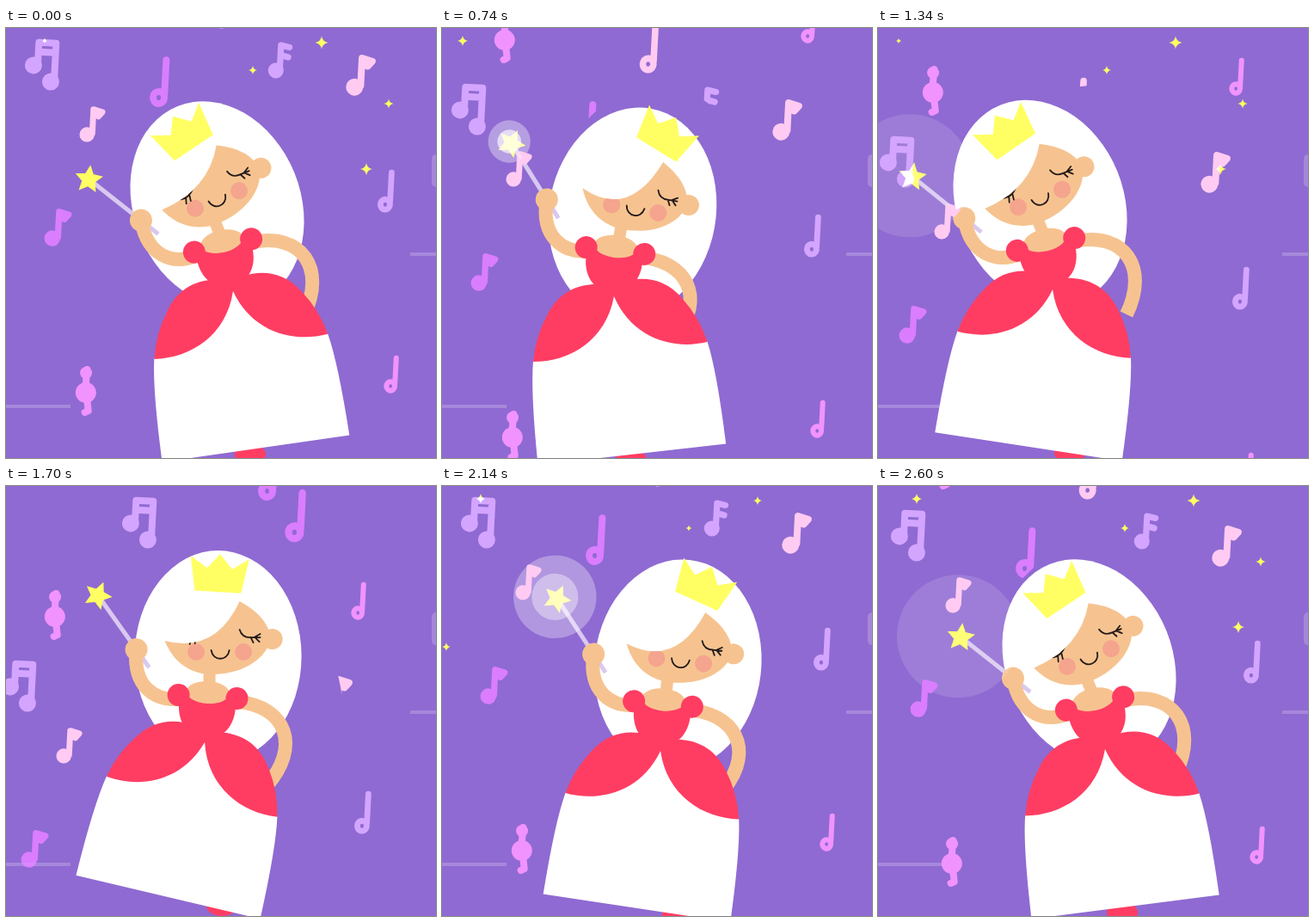
An HTML page with a canvas for the animation above (2.66 s loop, 500x500 px).

```html
<!DOCTYPE html>
<html lang="en">
<head>
<meta charset="utf-8">
<title>Dancing princess</title>
<style>
  html, body { margin: 0; height: 100%; overflow: hidden; background: #8f6ad2; }
  canvas { display: block; }
</style>
</head>
<body>
<canvas id="stage" width="500" height="500"></canvas>
<script>
const ctx = document.getElementById('stage').getContext('2d');
const LOOP = 2660, BEAT = LOOP / 2;
const SKIN = '#f6c390', RED = '#ff3d63', YELLOW = '#ffff63', INK = '#221a1a';
const LILAC = '#d3a5ff', VIOLET = '#da7dff', PINK = '#f193ff', PALE = '#ffcbf2';

// time, neck x, neck y, torso / head / crown / skirt tilt, waist x, waist y
const POSES = [
  [0, 252, 253, -13, -22, -34, -8.2, 264, 306],
  [340, 226, 238.5, -2.5, -6.5, -6, -14.2, 233, 292],
  [740, 201.5, 259, 6.6, 10, 31.5, -6.5, 200, 312],
  [1020, 191, 240, -3, -6, -1, 0, 197, 293],
  [1340, 195, 251.5, -12.5, -22, -34.6, 8.7, 203, 304],
  [1700, 234.5, 245, 3.3, 0, 3.4, 13.3, 231, 298],
  [2020, 254, 258, 6.6, 10, 32, 11, 248, 311],
  [2140, 257, 253.5, 5.5, 6.5, 24.6, 8.6, 254, 308],
  [2350, 259, 240, -3, -6, -1, 1, 263, 293],
  [2600, 252, 253, -13, -22, -33.5, -7.3, 264, 306]
];

// x, y, radius, start, duration
const SPARKLES = [
  [45, 15, 6, 660, 720], [287, 49, 5, 745, 915], [367, 17, 7.5, 745, 915],
  [445, 88, 5.5, 900, 800], [419, 164, 7, 900, 800], [5, 187, 5, 745, 455]
];

// shape, x, y, scale, colour
const NOTES = [
  ['pair', 43, 42, 1, LILAC], ['pair', 183, -148, 1, LILAC],
  ['half', 180, 63, 1, VIOLET], ['half', 365, -155, 1.05, VIOLET],
  ['half', 333, -202, 1, VIOLET], ['half', 253, -27, .95, PALE],
  ['half', 443, 190, .85, LILAC], ['half', 449, 403, .75, PINK],
  ['half', 438, -56, .75, PINK], ['flags', 318, 38, .9, LILAC],
  ['flag', 412, 55, 1, PALE], ['flag', 100, 112, .87, PALE],
  ['flag', 60, 232, .92, VIOLET],
  ['clef', 93, 421, 1, PINK], ['clef', 84, -41, 1, PINK]
];
const NOTE_STEP = 300;
const NOTE_SHIFT = [[0, 0], [-7, 15], [-11, 52], [-16, 82], [-20, 113], [-27, 190], [-34, 225]];
const STROKES = {
  pair: 'M-10 3h.1M10 20h.1M-6 2V-25H14V18M-6 -14H14',
  half: 'M5 -26V14M5 18a6.5 7 0 1 1 -13 0a6.5 7 0 1 1 13 0',
  flag: 'M1 12V-20L13 -17L8 -11L2 -14',
  flags: 'M1 12V-20L12 -18M2 -7L11 -5',
  clef: 'M0 -24L-1 6M1 6L4 24L0 26'
};
const HEADS = { pair: [[-11, 2, 10], [10, 20, 10]], half: [], flag: [[-6, 14, 10]],
  flags: [[-4, 13, 10]], clef: [[-1, -20, 7], [0, 3, 12]] };

const SKIRT = 'M-102 65Q-109 100 -110 185H110Q109 100 102 65L80 14L0 -10L-80 14Z';
const PETAL = 'M-8 -9C18 -20 55 -24 79 12Q96 36 102 65C60 70 15 50 0 0Z';
const CROWN = 'M-34 0L-27 40H27L34 0L15 13L0 -4L-14 13Z';

const mod = (a, b) => ((a % b) + b) % b;
const rad = deg => deg * Math.PI / 180;

// Smooth cyclic interpolation without overshoot
function poseAt(t) {
  const n = POSES.length;
  const key = i => ({ v: POSES[mod(i, n)], t: POSES[mod(i, n)][0] + Math.floor(i / n) * LOOP });
  let i = n - 1;
  while (POSES[i][0] > t) i--;
  const [a, b, c, d] = [key(i - 1), key(i), key(i + 1), key(i + 2)];
  const h = c.t - b.t, u = (t - b.t) / h;
  const slope = (p, q, k) => (q.v[k] - p.v[k]) / (q.t - p.t);
  const tangent = (p, q) => p * q > 0 ? 2 * p * q / (p + q) : 0;
  return b.v.map((v, k) => {
    const s = slope(b, c, k);
    const m0 = tangent(slope(a, b, k), s) * h, m1 = tangent(s, slope(c, d, k)) * h;
    const delta = c.v[k] - v;
    return v + u * (m0 + u * (3 * delta - 2 * m0 - m1 + u * (m0 + m1 - 2 * delta)));
  }).slice(1);
}

function group(x, y, tilt, draw) {
  ctx.save();
  ctx.translate(x, y);
  ctx.rotate(rad(tilt));
  draw();
  ctx.restore();
}
function fill(d, color) {
  ctx.fillStyle = color;
  ctx.fill(new Path2D(d));
}
function stroke(d, color, width, cap = 'butt') {
  ctx.strokeStyle = color;
  ctx.lineWidth = width;
  ctx.lineCap = cap;
  ctx.lineJoin = 'round';
  ctx.stroke(new Path2D(d));
}
function oval(x, y, rx, ry, color) {
  ctx.fillStyle = color;
  ctx.beginPath();
  ctx.ellipse(x, y, rx, ry, 0, 0, 7);
  ctx.fill();
}
const dot = (x, y, r, color) => oval(x, y, r, r, color);

function star(x, y, r) {
  ctx.fillStyle = YELLOW;
  ctx.beginPath();
  for (let i = 0; i < 10; i++) {
    const a = rad(20 + i * 36), q = i % 2 ? r * .48 : r;
    ctx.lineTo(x + q * Math.sin(a), y - q * Math.cos(a));
  }
  ctx.fill();
}

function drawHead(tilt) {
  const bang = Math.max(-66, 1.2 * tilt - 50);
  const face = `M-50 -65Q9 ${bang} 37 -111Q72 -92 73 -66C66 -40 35 -26 6 -26C-25 -26 -42 -45 -50 -65Z`;
  stroke('M2 2V-32', SKIN, 14);
  dot(75, -67, 12, SKIN);
  fill(face, SKIN);
  ctx.clip(new Path2D(face + 'M60 -85h30v30h-30Z'));
  dot(-13.5, -52, 10, '#f5a48e');
  dot(41.5, -52, 10, '#f5a48e');
  stroke('M4 -54C6 -41 23 -41 25 -54', INK, 1.8, 'round');
  stroke('M37 -78q3 10 14 9h10M50 -69l3 6M55 -69l5 5M54 -69l7 -4', INK, 1.8, 'round');
  stroke('M-25 -68q10 2 17 -6M-19 -67l-2 6M-14 -68l-1 6', INK, 1.8, 'round');
}

function drawPrincess([x, y, torso, head, crown, skirt, wx, wy]) {
  group(x, y, head, () => oval(12, -47, 97, 123, '#fff'));
  group(x, y, torso, () => stroke('M36 4C92 6 112 52 74 100', SKIN, 16));
  group(x, y, head, () => drawHead(head));

  oval(wx + 20, wy + 190, 18, 12, RED);
  group(wx, wy, skirt, () => {
    fill(SKIRT, '#fff');
    fill(PETAL, RED);
    ctx.scale(-1, 1);
    fill(PETAL, RED);
  });

  group(x, y, torso, () => {
    stroke('M-70 -30L-134 -110', '#d9c8f0', 5);
    stroke('M-30 4C-60 10 -88 -6 -86 -50', SKIN, 16);
    dot(-86, -50, 13, SKIN);
    star(-134.5, -110, 17);
    fill('M-33 10C-33 62 33 62 33 10L28 -8H-28Z', RED);
    oval(0, -5, 25, 13, SKIN);
    dot(-34, 0, 13, RED);
    dot(34, 0, 13, RED);
  });

  const a = rad(.69 * crown + 2.6), r = 162 + .14 * crown;
  group(x + r * Math.sin(a), y - r * Math.cos(a), crown, () => fill(CROWN, YELLOW));
}

function drawGlow(t, [x, y, torso]) {
  const age = t - (t < 1930 ? 660 : 1930);
  if (age < 0 || age > 730) return;
  const r = 74 * (1 - Math.exp(-age / 200));
  group(x, y, torso, () => {
    dot(-137, -112, r, `rgba(255,255,255,${.38 * (1 - age / 1000)})`);
    if (age < 400) dot(-137, -112, r * .56, `rgba(255,255,255,${.8 * (1 - age / 400)})`);
  });
}

function drawSparkles(t) {
  for (const [x, y, size, start, length] of SPARKLES) {
    const since = mod(t - start, LOOP), age = since % BEAT;
    if (age > length) continue;
    const r = size * Math.min(1, 3 * Math.sin(Math.PI * age / length));
    group(x - (since < BEAT ? 21 : 0), y, 0, () =>
      fill(`M0 ${-r}Q${r * .15} ${-r * .15} ${r} 0Q${r * .15} ${r * .15} 0 ${r}` +
        `Q${-r * .15} ${r * .15} ${-r} 0Q${-r * .15} ${-r * .15} 0 ${-r}Z`, YELLOW));
  }
}

function drawNotes(t) {
  const [dx, dy] = NOTE_SHIFT[Math.floor(t / NOTE_STEP) % NOTE_SHIFT.length];
  ctx.save();
  ctx.beginPath();
  ctx.rect(0, 0, 500, 500);
  ctx.ellipse(250, 300, 145, 233, 0, 0, 7);
  ctx.clip('evenodd');
  ctx.globalCompositeOperation = 'lighten';
  for (const [shape, x, y, scale, color] of NOTES) {
    group(x + dx, y + dy, 3, () => {
      ctx.scale(scale, scale);
      stroke(STROKES[shape], color, 8, 'round');
      for (const [hx, hy, r] of HEADS[shape]) dot(hx, hy, r, color);
    });
  }
  ctx.restore();
}

function drawBackground() {
  ctx.fillStyle = '#8f6ad2';
  ctx.fillRect(0, 0, 500, 500);
  ctx.fillStyle = 'rgba(255,255,255,.2)';
  ctx.fillRect(0, 438, 75, 4);
  ctx.fillRect(470, 261, 30, 4);
  ctx.beginPath();
  ctx.roundRect(495, 147, 20, 38, 5);
  ctx.fill();
}

function frame() {
  const t = performance.now() % LOOP, pose = poseAt(t);
  drawBackground();
  drawPrincess(pose);
  drawSparkles(t);
  drawGlow(t, pose);
  drawNotes(t);
  requestAnimationFrame(frame);
}
frame();
</script>
</body>
</html>
```
